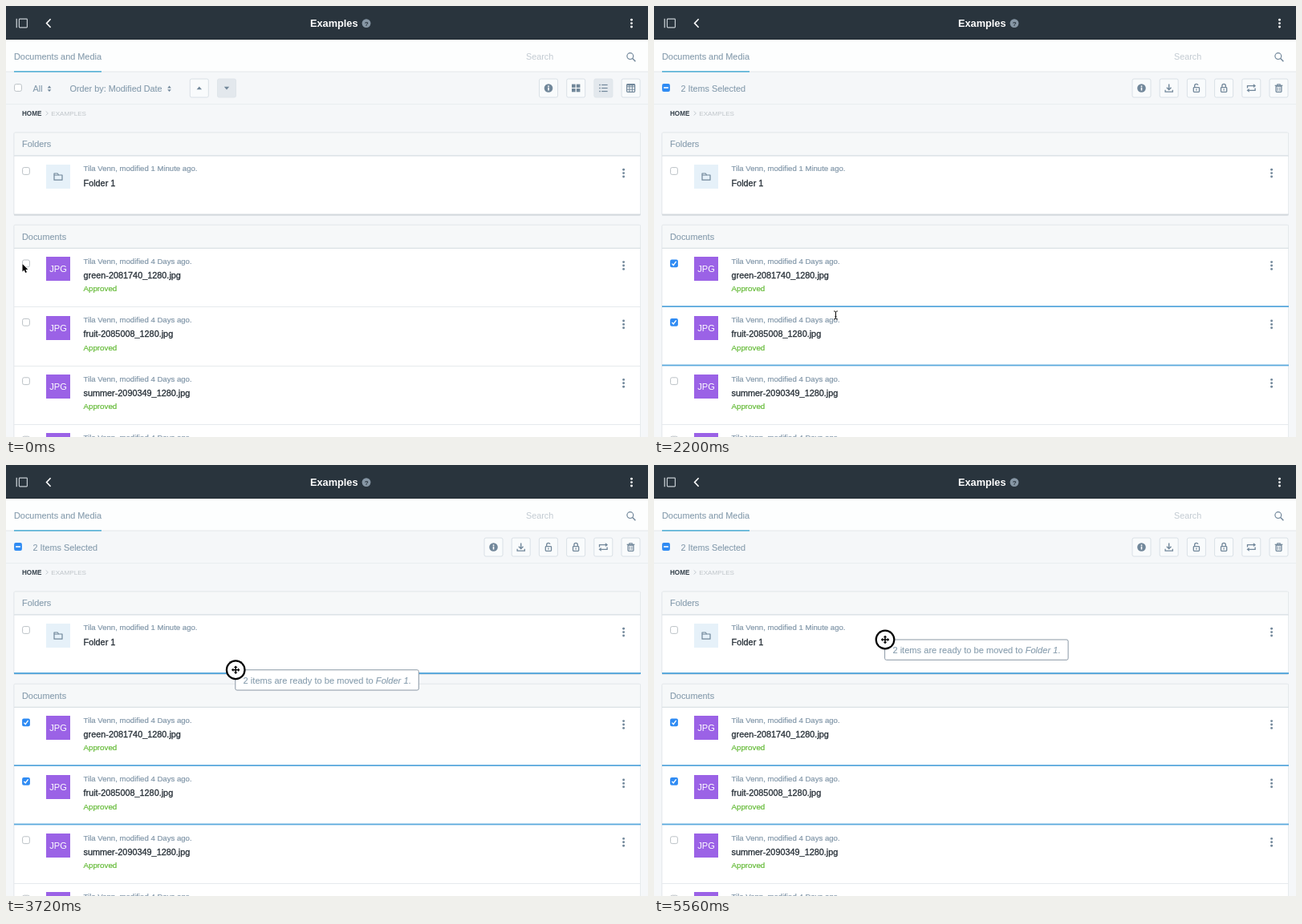
Recreate the animation shown at these times as an HTML page with a canvas. Size 800 by 538 pixels, loop 5580 ms.

```html
<!DOCTYPE html>
<html lang="en">
<head>
<meta charset="utf-8">
<title>Documents and Media</title>
<style>
html, body { margin: 0; width: 100%; height: 100%; overflow: hidden; background: #f5f7f9; }
canvas { display: block; width: 800px; height: 538px; }
</style>
</head>
<body>
<canvas id="stage"></canvas>
<script>
const W = 800, H = 538, LOOP = 5580;
const FONT = '"Liberation Sans", Arial, sans-serif';
const GREY = '#869cad', DARK = '#252e36', ICON = '#71879a', BLUE = '#5aa9dc', CHECK = '#2f8bf3';
const OWNER = 'Tila Venn';
const FILES = ['green-2081740_1280.jpg', 'fruit-2085008_1280.jpg', 'summer-2090349_1280.jpg', 'leaves-2091560_1280.jpg'];
const ROW_TOP = 302.2, ROW_H = 73.4;

// Times of the interface changes
const FIRST = 820, SECOND = 1720, DRAG = 2860;

// Pointer path: time, x, y
const PATH = [
  [0, 20.5, 322], [260, 20.5, 322], [520, 24, 320.5], [1160, 24, 320.5],
  [1560, 25, 394], [1780, 25, 394], [2190, 224.5, 386], [2320, 240, 385.5],
  [2700, 291, 384], [2860, 291, 384], [3420, 287, 295], [3920, 286, 238],
  [4400, 287.4, 219.3], [4480, 288, 218], [LOOP, 288, 218]
];

const canvas = document.getElementById('stage');
const g = canvas.getContext('2d');
const dpr = window.devicePixelRatio || 1;
canvas.width = W * dpr;
canvas.height = H * dpr;

function rect(x, y, w, h, color) {
  g.fillStyle = color;
  g.fillRect(x, y, w, h);
}

function box(x, y, w, h, r, fill, stroke, lw = 1) {
  g.beginPath();
  g.roundRect(x, y, w, h, r);
  if (fill) { g.fillStyle = fill; g.fill(); }
  if (stroke) { g.strokeStyle = stroke; g.lineWidth = lw; g.stroke(); }
}

function disc(x, y, r, color) {
  g.beginPath();
  g.arc(x, y, r, 0, Math.PI * 2);
  g.fillStyle = color;
  g.fill();
}

function line(points, color, lw = 1.3) {
  g.beginPath();
  points.forEach(([x, y], i) => i ? g.lineTo(x, y) : g.moveTo(x, y));
  g.strokeStyle = color;
  g.lineWidth = lw;
  g.stroke();
}

function poly(points, color) {
  g.beginPath();
  points.forEach(([x, y]) => g.lineTo(x, y));
  g.closePath();
  g.fillStyle = color;
  g.fill();
}

// "extra" thickens the strokes for medium weights
function text(str, x, y, size, color, extra = 0, style = '') {
  g.font = `${style} ${size}px ${FONT}`;
  g.fillStyle = color;
  g.fillText(str, x, y);
  if (extra) {
    g.strokeStyle = color;
    g.lineWidth = extra;
    g.strokeText(str, x, y);
  }
  return g.measureText(str).width;
}

function at(x, y, draw) {
  g.save();
  g.translate(x, y);
  draw();
  g.restore();
}

function dots(x, y, color) {
  for (const d of [-4.4, 0, 4.4]) disc(x, y + d, 1.45, color);
}

function checkbox(x, y, state) {
  at(x, y, () => {
    if (!state) return box(-4.4, -4.4, 8.8, 8.8, 2, '#fff', '#b4bac0', 0.9);
    box(-4.9, -4.9, 9.8, 9.8, 2, CHECK);
    if (state === 'some') rect(-2.9, -0.8, 5.8, 1.6, '#fff');
    else line([[-2.6, 0.2], [-0.8, 2.2], [2.6, -2.5]], '#fff', 1.4);
  });
}

const icons = {
  up: () => poly([[-3.2, 1.7], [0, -1.9], [3.2, 1.7]], ICON),
  down: () => poly([[-3.2, -1.7], [0, 1.9], [3.2, -1.7]], ICON),
  info() {
    disc(0, 0, 5.3, ICON);
    rect(-0.8, -0.9, 1.6, 3.9, '#fff');
    rect(-0.8, -3.1, 1.6, 1.5, '#fff');
  },
  cards() {
    for (const x of [-5.2, 0.6]) for (const y of [-4.9, 0.5]) rect(x, y, 4.6, 4.3, ICON);
  },
  list() {
    for (const y of [-4, 0, 4]) {
      rect(-5.2, y - 0.7, 1.6, 1.4, ICON);
      rect(-2.2, y - 0.6, 7.4, 1.2, ICON);
    }
  },
  table() {
    box(-5, -4.8, 10, 9.6, 1, null, ICON, 1.2);
    rect(-5, -4.8, 10, 1.6, ICON);
    for (const v of [-1.7, 1.7]) {
      line([[v, -4.5], [v, 4.5]], ICON, 1);
      line([[-5, v], [5, v]], ICON, 1);
    }
  },
  download() {
    line([[0, -5], [0, 1.5]], ICON, 1.4);
    line([[-2.8, -0.8], [0, 2], [2.8, -0.8]], ICON, 1.4);
    line([[-4.6, 2.2], [-4.6, 4.6], [4.6, 4.6], [4.6, 2.2]], ICON, 1.3);
  },
  lock(open) {
    box(-3.6, -0.8, 7.2, 5.6, 0.8, null, ICON, 1.3);
    g.beginPath();
    g.moveTo(-2.2, -1);
    g.lineTo(-2.2, -3);
    g.arc(0, -3, 2.2, Math.PI, open ? Math.PI * 1.9 : 0);
    if (!open) g.lineTo(2.2, -1);
    g.stroke();
    rect(-0.6, 0.9, 1.2, 2.2, ICON);
  },
  unlock: () => icons.lock(true),
  move() {
    line([[-4.8, 0], [-4.8, -2.8], [3, -2.8]], ICON);
    line([[4.8, 0], [4.8, 2.8], [-3, 2.8]], ICON);
    poly([[2.6, -5.2], [5.8, -2.8], [2.6, -0.4]], ICON);
    poly([[-2.6, 5.2], [-5.8, 2.8], [-2.6, 0.4]], ICON);
  },
  trash() {
    box(-3.4, -2.5, 6.8, 7.4, 0.8, null, ICON, 1.3);
    line([[-4.8, -3.2], [4.8, -3.2]], ICON, 1.3);
    line([[-1.7, -3.4], [-1.7, -4.8], [1.7, -4.8], [1.7, -3.4]], ICON, 1.1);
    for (const x of [-1.3, 1.3]) line([[x, -1], [x, 3.4]], ICON, 1);
  }
};

function button(x, name, active) {
  const y = 102.5;
  box(x - 11.5, y - 11.5, 23, 23, 2, active ? '#e3e8ed' : '#f9fbfc', active ? '#dfe5ea' : '#d9e0e6');
  at(x, y, () => icons[name]());
}

function sorter(x) {
  poly([[x - 2.3, 102.4], [x, 99.6], [x + 2.3, 102.4]], ICON);
  poly([[x - 2.3, 104.2], [x, 107], [x + 2.3, 104.2]], ICON);
}

function header() {
  rect(0, 0, W, 42, '#29343d');
  rect(0, 41, W, 1, '#1f2930');
  rect(12.6, 15.8, 1.3, 11.4, '#c5ccd2');
  box(16.4, 16.2, 10, 10.6, 0.8, null, '#c5ccd2', 1.2);
  line([[55.6, 16.3], [50.6, 21.5], [55.6, 26.7]], '#fff', 1.6);
  text('Examples', 379, 26.1, 12.75, '#fff', 0, 'bold');
  disc(449, 21.6, 5.4, '#8797a5');
  text('?', 446.7, 24.6, 8, '#29343d', 0, 'bold');
  dots(779.5, 21.6, '#fff');

  rect(0, 42, W, 40, '#fdfefe');
  rect(0, 81.5, W, 1, '#e3e8ec');
  text('Documents and Media', 10, 66.5, 10.9, GREY, 0.12);
  rect(10, 81, 109, 1.7, '#5db4d8');
  text('Search', 648, 66.5, 10.8, '#c3cbd2');
  g.beginPath();
  g.arc(777.8, 62.6, 3.9, 0, Math.PI * 2);
  g.strokeStyle = ICON;
  g.lineWidth = 1.2;
  g.stroke();
  line([[780.7, 65.5], [784.4, 69.2]], ICON, 1.4);
}

function toolbar(count) {
  rect(0, 122, W, 1, '#e9edf0');
  checkbox(15, 102, count ? 'some' : '');
  if (count) {
    text(count + ' Items Selected', 33.6, 106.6, 10.8, GREY, 0.12);
    ['info', 'download', 'unlock', 'lock', 'move', 'trash']
      .forEach((name, i) => button(607.5 + i * 34.2, name));
  } else {
    text('All', 33.6, 106.6, 10.85, GREY, 0.12);
    sorter(54);
    text('Order by: Modified Date', 79.5, 106.6, 10.85, GREY, 0.12);
    sorter(203.5);
    button(240.8, 'up');
    button(275, 'down', true);
    ['info', 'cards', 'list', 'table']
      .forEach((name, i) => button(676 + i * 34.2, name, name === 'list'));
  }
  text('HOME', 20, 136.8, 8.15, '#35414b', 0, 'bold');
  line([[49.6, 131.4], [52.4, 133.9], [49.6, 136.4]], '#c0c7cd', 0.9);
  text('EXAMPLES', 56.3, 136.8, 8.1, '#bfc5ca');
}

function panel(title, y, h) {
  box(9.5, y, 781.5, h + 1, 2, '#dde2e6');
  rect(10, y + h - 1, 780.5, 2, '#d3d9dd');
  rect(10.3, y + 0.8, 780, 28.4, '#f6f8f9');
  rect(10.3, y + 29, 780, 1, '#cfd7dd');
  rect(10.3, y + 30, 780, h - 31, '#fff');
  text(title, 20, y + 18.8, 10.9, GREY, 0.12);
}

function entry(y, age, name, checked) {
  checkbox(25, y + 19.2, checked);
  text(`${OWNER}, modified ${age} ago.`, 96.5, y + 19.6, 9.6, '#8096a8', 0.2);
  text(name, 96.5, y + 37.7, 10.87, DARK, 0.3);
  dots(769.6, y + 21.8, ICON);
}

function folders(over) {
  panel('Folders', 157.5, 103);
  entry(186.8, '1 Minute', 'Folder 1', false);
  rect(50, 198, 30, 30, '#e6f1f9');
  at(65, 213, () => {
    g.lineJoin = 'round';
    line([[-5, 4.2], [-5, -4], [-0.8, -4], [0.6, -2], [5, -2], [5, 4.2], [-5, 4.2], [-5, 3]], ICON, 1.2);
    line([[-5, -1.9], [0.6, -1.9]], ICON, 1);
    g.lineJoin = 'miter';
  });
  if (over) rect(10, 259, 781, 2, BLUE);
}

function documents(count) {
  panel('Documents', 272.8, 300);
  FILES.forEach((name, i) => {
    const y = ROW_TOP + i * ROW_H, picked = i < count;
    entry(y, '4 Days', name, picked);
    rect(50, Math.round(y + 11), 30, 30, '#9b62e6');
    text('JPG', 54.2, y + 29.9, 11.1, '#fff');
    text('Approved', 96.5, y + 54.2, 9.75, '#61b933', 0.2);
    if (picked) rect(10, y + 72, 781, 1.8, BLUE);
    else rect(10, Math.round(y + 73), 781, 1, '#e6eaed');
  });
}

// Monotone cubic through the path, so rests stay still and moves flow
function pointer(t) {
  const slope = (i, k) => (PATH[i + 1][k] - PATH[i][k]) / (PATH[i + 1][0] - PATH[i][0]);
  const tangent = (i, k) => {
    if (i < 1 || i > PATH.length - 2) return 0;
    const a = slope(i - 1, k), b = slope(i, k);
    return a * b <= 0 ? 0 : 2 * a * b / (a + b);
  };
  let i = 0;
  while (i < PATH.length - 2 && t >= PATH[i + 1][0]) i++;
  const span = PATH[i + 1][0] - PATH[i][0], u = (t - PATH[i][0]) / span;
  const u2 = u * u, u3 = u2 * u;
  return [1, 2].map(k =>
    (2 * u3 - 3 * u2 + 1) * PATH[i][k] + (3 * u2 - 2 * u3) * PATH[i + 1][k] +
    span * ((u3 - 2 * u2 + u) * tangent(i, k) + (u3 - u2) * tangent(i + 1, k)));
}

function arrow() {
  const shape = [[0, 0], [0, 9.6], [2.2, 7.6], [3.7, 11], [5.4, 10.2], [3.9, 7], [6.8, 7]];
  line([...shape, shape[0]], '#fff', 1.6);
  poly(shape, '#000');
}

function hand() {
  g.beginPath();
  g.moveTo(-1.1, 6.4);
  g.lineTo(-1.1, 0.9);
  g.quadraticCurveTo(0, -0.8, 1.1, 0.9);
  g.lineTo(1.1, 4.1);
  g.lineTo(4.9, 4.9);
  g.quadraticCurveTo(6.2, 5.2, 6, 7);
  g.lineTo(4.8, 11.4);
  g.lineTo(0, 11.4);
  g.lineTo(-3.2, 7.2);
  g.quadraticCurveTo(-3, 5.6, -1.1, 6.9);
  g.closePath();
  g.fillStyle = '#fff';
  g.fill();
  g.strokeStyle = '#111';
  g.lineWidth = 1;
  g.stroke();
  for (const x of [1.4, 2.9, 4.4]) line([[x, 4.8], [x, 6.6]], '#111', 0.7);
}

function beam() {
  line([[0, -4], [0, 4]], '#111', 1.1);
  line([[-2.4, -5], [-0.8, -4.8], [0, -4], [0.8, -4.8], [2.4, -5]], '#111', 1);
  line([[-2.4, 5], [-0.8, 4.8], [0, 4], [0.8, 4.8], [2.4, 5]], '#111', 1);
  line([[-1.2, 1.8], [1.2, 1.8]], '#111', 0.8);
}

function dragMark() {
  disc(0, 0, 12.4, '#000');
  disc(0, 0, 10.2, '#fff');
  for (let i = 0; i < 4; i++) {
    g.rotate(Math.PI / 2);
    line([[0, 0], [0, -3.5]], '#000', 1.5);
    poly([[-2.3, -2.8], [0, -5.3], [2.3, -2.8]], '#000');
  }
}

function tooltip(x, y, over) {
  const size = 11.1, base = y + 17;
  const w = over ? 228.5 : 173.5;
  box(x, y, w, 25.3, 2, '#fff', '#8a98a5', 1);
  let tx = x + 9.8;
  if (!over) return text('2 items are ready to be moved.', tx, base, size, GREY, 0.1);
  tx += text('2 items are ready to be moved to ', tx, base, size, GREY, 0.1);
  tx += text('Folder 1', tx, base, size, GREY, 0.1, 'italic');
  text('.', tx, base, size, GREY, 0.1);
}

function render(t) {
  g.setTransform(dpr, 0, 0, dpr, 0, 0);
  const [x, y] = pointer(t);
  const count = (t >= FIRST) + (t >= SECOND);
  const dragging = t >= DRAG;
  const over = dragging && y < 260;

  rect(0, 0, W, H, '#f5f7f9');
  header();
  toolbar(count);
  folders(over);
  documents(count);

  if (dragging) {
    tooltip(x + (over ? -0.4 : 1), y, over);
    at(x, y, dragMark);
    return;
  }
  const onBox = Math.abs(x - 25) < 4.3 &&
    [0, 1].some(i => Math.abs(y - (ROW_TOP + i * ROW_H + 19.2)) < 5);
  at(x, y, onBox ? hand : x > 96 ? beam : arrow);
}

const start = performance.now();
function tick() {
  render((performance.now() - start) % LOOP);
  requestAnimationFrame(tick);
}
tick();
</script>
</body>
</html>
```
